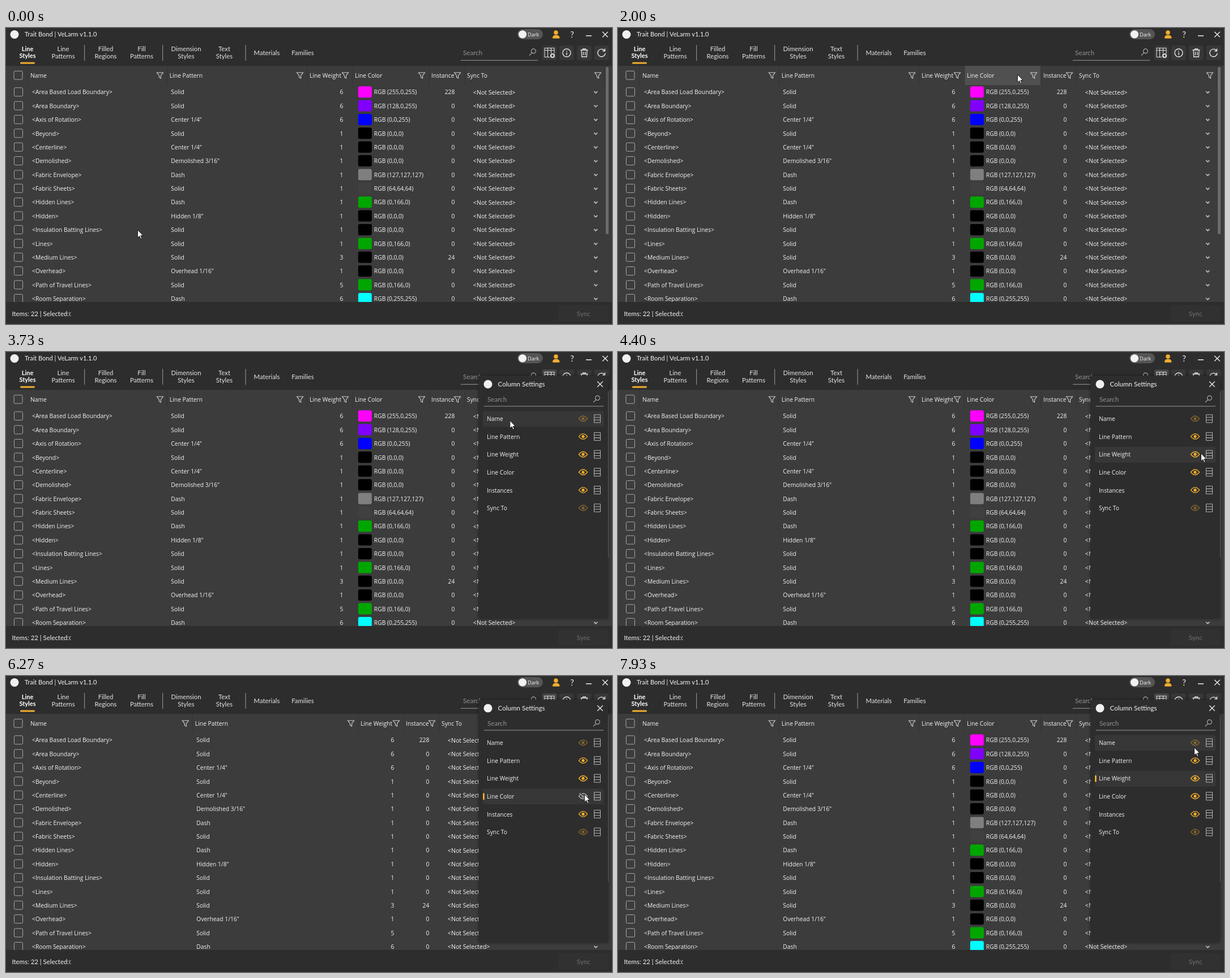
An HTML page with a canvas for the animation above (8000 ms loop, 1070x524 px).

```html
<!DOCTYPE html>
<html lang="en">
<head>
<meta charset="utf-8">
<title>Column settings</title>
<style>
html, body { margin: 0; width: 100%; height: 100%; overflow: hidden; background: #2d2d2d; }
canvas { display: block; width: 1070px; height: 524px; }
</style>
</head>
<body>
<canvas id="stage"></canvas>
<script>
const W = 1070, H = 524, LOOP = 8000;
const canvas = document.getElementById('stage');
const ctx = canvas.getContext('2d');
const ratio = window.devicePixelRatio || 1;
canvas.width = W * ratio;
canvas.height = H * ratio;

const UI = '"Open Sans", "Noto Sans", sans-serif';
const HEAD = 'Lato, "Open Sans", sans-serif';
const BAR = '#2d2d2d', BODY = '#3c3c3c', TEXT = '#f4f4f4', ICON = '#d0d0d0', GOLD = '#f2ae2e';

// name, pattern, weight, colour, instances
const ROWS = [
  ['Area Based Load Boundary', 'Solid', 6, '255,0,255', 228],
  ['Area Boundary', 'Solid', 6, '128,0,255', 0],
  ['Axis of Rotation', 'Center 1/4"', 6, '0,0,255', 0],
  ['Beyond', 'Solid', 1, '0,0,0', 0],
  ['Centerline', 'Center 1/4"', 1, '0,0,0', 0],
  ['Demolished', 'Demolished 3/16"', 1, '0,0,0', 0],
  ['Fabric Envelope', 'Dash', 1, '127,127,127', 0],
  ['Fabric Sheets', 'Solid', 1, '64,64,64', 0],
  ['Hidden Lines', 'Dash', 1, '0,166,0', 0],
  ['Hidden', 'Hidden 1/8"', 1, '0,0,0', 0],
  ['Insulation Batting Lines', 'Solid', 1, '0,0,0', 0],
  ['Lines', 'Solid', 1, '0,166,0', 0],
  ['Medium Lines', 'Solid', 3, '0,0,0', 24],
  ['Overhead', 'Overhead 1/16"', 1, '0,0,0', 0],
  ['Path of Travel Lines', 'Solid', 5, '0,166,0', 0],
  ['Room Separation', 'Dash', 6, '0,255,255', 0]
];
const FIELDS = ['Name', 'Line Pattern', 'Line Weight', 'Line Color', 'Instances', 'Sync To'];

// pointer path: time, x, y
const PATH = [
  [0, 232, 357], [530, 660, 140], [730, 795, 66], [870, 756, 55], [1600, 756, 55],
  [2000, 705, 82], [2070, 705, 82], [2470, 957, 46], [2600, 968, 49], [2740, 968, 49],
  [3070, 944, 104], [3600, 873, 113], [4270, 1032, 189], [4400, 1029, 179],
  [4470, 1025, 176], [5270, 1020, 213], [5470, 1020, 213], [5930, 1020.5, 219],
  [6070, 1021, 213], [6130, 1021, 209], [6470, 1021, 209], [6800, 1017, 182],
  [7600, 1017, 182], [7930, 1017, 126], [8000, 1017, 126]
];

function pointerAt(t) {
  let i = 1;
  while (i < PATH.length - 1 && t > PATH[i][0]) i++;
  const [t0, x0, y0] = PATH[i - 1], [t1, x1, y1] = PATH[i];
  const p = Math.min(1, Math.max(0, (t - t0) / (t1 - t0)));
  const e = p * p * (3 - 2 * p);
  return { x: x0 + (x1 - x0) * e, y: y0 + (y1 - y0) * e };
}

function stateAt(t) {
  const noColor = t >= 5530 && t < 6465;
  const noWeight = t >= 6925 && t < 7595;
  return {
    open: t >= 2795,
    hidden: noColor ? 3 : noWeight ? 2 : -1,
    selected: t >= 6860 ? 2 : t >= 5260 ? 3 : -1,
    pointer: pointerAt(t)
  };
}

function label(str, x, y, { size = 10.3, font = UI, color = TEXT, align = 'left', weight = 400 } = {}) {
  ctx.font = `${weight} ${size}px ${font}`;
  ctx.textAlign = align;
  ctx.fillStyle = color;
  ctx.fillText(str, x, y + size * 0.36);
}

function box(x, y, w, h, color, r = 0) {
  ctx.fillStyle = color;
  ctx.beginPath();
  ctx.roundRect(x, y, w, h, r);
  ctx.fill();
}

function frame(x, y, w, h, color, r = 0) {
  ctx.strokeStyle = color;
  ctx.lineWidth = 1;
  ctx.beginPath();
  ctx.roundRect(x, y, w, h, r);
  ctx.stroke();
}

function disc(x, y, r, color) {
  ctx.fillStyle = color;
  ctx.beginPath();
  ctx.arc(x, y, r, 0, Math.PI * 2);
  ctx.fill();
}

function stroke(x, y, d, color = ICON, width = 1.1) {
  ctx.save();
  ctx.translate(x, y);
  ctx.strokeStyle = color;
  ctx.lineWidth = width;
  ctx.stroke(new Path2D(d));
  ctx.restore();
}

const funnel = (x) => stroke(x, 84, 'M-5.5-5H5.5L1.5 .2V5L-1.5 3.2V.2Z');
const lens = (x, y) => stroke(x, y, 'M-1.2 1.4A4 4 0 1 1 1.2 2.4A4 4 0 0 1-1.2 1.4L-6 6', '#b0b0b0');
const cross = (x, y) => stroke(x, y, 'M-4.8-4.8L4.8 4.8M4.8-4.8L-4.8 4.8', '#f0f0f0', 1.3);
const check = (x, y) => frame(x - 7.5, y - 7.5, 15, 15, '#a8a8a8', 2);

function titleBar() {
  disc(15, 11.5, 7.5, '#f0f0f0');
  label('Trait Bond | VeLarm v1.1.0', 33, 11.5, { font: HEAD, size: 11 });
  box(903, 2, 45, 18, '#555', 9);
  disc(912, 11.3, 7, '#f2f2f2');
  label('Dark', 921, 11.3, { size: 9.2 });
  disc(971, 8, 3.8, GOLD);
  box(965, 12.5, 12.5, 6, GOLD, [5, 5, 1, 1]);
  label('?', 999.5, 11.5, { font: HEAD, size: 15, align: 'center' });
  box(1024, 13, 10, 1.5, '#f0f0f0');
  cross(1058, 11.5);
}

function tabs() {
  const opts = { font: HEAD, size: 11.3, align: 'center', color: '#e4e4e4' };
  const pairs = [['Line', 'Styles', 38], ['Line', 'Patterns', 101], ['Filled', 'Regions', 176],
    ['Fill', 'Patterns', 239.5], ['Dimension', 'Styles', 318], ['Text', 'Styles', 385.5]];
  pairs.forEach(([a, b, x], i) => {
    const o = i ? opts : { ...opts, weight: 700, color: '#fff', size: 11 };
    label(a, x, 37.3, o);
    label(b, x, 49.5, o);
  });
  label('Materials', 460.5, 44, opts);
  label('Families', 524, 44, opts);
  box(25, 60.5, 26, 3, GOLD, 1.5);
  for (const x of [138, 276, 422.5]) box(x, 30, 1.2, 28, '#8a8a8a');
}

function columnsIcon(x, y) {
  frame(x - 8.5, y - 8.5, 17, 16, '#e0e0e0');
  stroke(x, y, 'M-8.5-4.5H8.5M-3-8.5V7.5M3-8.5V7.5', '#e0e0e0');
  disc(x + 5.5, y + 5, 5.3, '#383838');
  stroke(x + 5.5, y + 5, 'M-3 0A3 3 0 1 0 3 0A3 3 0 1 0-3 0', '#e0e0e0', 2.2);
}

function tools(open) {
  label('Search', 807, 44, { font: HEAD, size: 11.6, color: '#929292' });
  box(803, 56.8, 136, 1, '#9a9a9a');
  lens(930, 42.5);
  [947, 977, 1008, 1039].forEach((x, i) => box(x, 31, 25.5, 26, open && !i ? '#484848' : '#383838', 3));
  columnsIcon(959.5, 44);
  stroke(990, 44, 'M-7 0A7 7 0 1 0 7 0A7 7 0 1 0-7 0M0-3.8V-2.2M0-.8V4', '#e8e8e8', 1.4);
  stroke(1021, 44, 'M-6.5-5H6.5M-2.5-5V-7H2.5V-5M-5-5L-4.3 7H4.3L5-5M-1.7-2V4M1.7-2V4', '#e8e8e8', 1.3);
  stroke(1051.5, 44, 'M5.5-3.8A6.7 6.7 0 1 0 6.7 .5M6-7.5V-3.3H1.8', '#e8e8e8', 1.4);
}

// fixed columns keep their width, the other three share what is left
function layout(hidden) {
  const widths = [0, 0, 80, 135, 63, 0];
  if (hidden >= 0) widths[hidden] = 0;
  const share = (1019.5 - widths.reduce((a, b) => a + b)) / 3;
  let x = 37;
  return widths.map((w, i) => {
    const col = { x, w: w || (i === hidden ? 0 : share), on: i !== hidden };
    x += col.w;
    return col;
  });
}

function headerRow(cols, pointer, open) {
  const fits = pointer.y > 67 && pointer.y < 101 && !open;
  check(21.5, 83.7);
  cols.forEach((c, i) => {
    if (!c.on) return;
    if (fits && pointer.x >= c.x && pointer.x < c.x + c.w) box(c.x, 67, c.w, 34, '#505050');
    box(c.x, 67, 1, 34, '#333');
    label(i === 4 ? 'Instance' : FIELDS[i], c.x + (i ? 4.7 : 6), 84);
    funnel(i === 5 ? 1045 : c.x + c.w - 12.3);
  });
  box(1056, 67, 1, 34, '#333');
}

function dataRow(row, y, cols) {
  const [name, pattern, weight, color, count] = row;
  const [, pat, wgt, clr, inst, sync] = cols;
  check(22, y - 0.5);
  label(`<${name}>`, 46, y);
  label(pattern, pat.x + 7.2, y);
  if (wgt.on) label(weight, wgt.x + 64, y, { align: 'right' });
  if (clr.on) {
    box(clr.x + 10.5, y - 10.5, 24, 20, `rgb(${color})`, 3);
    label(`RGB (${color})`, clr.x + 38.5, y);
  }
  label(count, inst.x + 46, y, { align: 'right' });
  label('<Not Selected>', sync.x + 15.5, y, { size: 10.6 });
  stroke(1041.3, y, 'M-3-1.5L0 1.5L3-1.5', '#b8b8b8', 1.8);
}

function table(state) {
  const cols = layout(state.hidden);
  ctx.save();
  ctx.beginPath();
  ctx.rect(0, 67, W, 418);
  ctx.clip();
  box(0, 67, W, 418, BODY);
  headerRow(cols, state.pointer, state.open);
  ROWS.forEach((row, i) => dataRow(row, 113.7 + i * 24.38, cols));
  box(1059, 69, 5, 296, '#6c6c6c', 2);
  ctx.restore();
}

function footer() {
  const opts = { font: HEAD, size: 11.4 };
  label('Items: 22 | Selected:', 10.5, 505.7, opts);
  ctx.save();
  ctx.beginPath();
  ctx.rect(111, 495, 3.5, 20);
  ctx.clip();
  label('0', 111.5, 506, { font: HEAD, size: 10 });
  ctx.restore();
  box(975, 491, 89, 29, '#313131', 3);
  label('Sync', 1019.7, 505.7, { font: HEAD, size: 11.6, color: '#707070', align: 'center' });
}

function eye(x, y, dim, off) {
  ctx.save();
  ctx.globalAlpha = dim ? 0.42 : 1;
  const color = off ? '#b0b0b0' : GOLD;
  stroke(x, y, 'M-7.5 0Q0-9.5 7.5 0Q0 9.5-7.5 0Z', color, 1.4);
  disc(x, y, 2.6, color);
  if (off) {
    stroke(x, y, 'M-6-6L7 6', '#363636', 3);
    stroke(x, y, 'M-6.5-5.5L6.5 6', color, 1.3);
  }
  ctx.restore();
}

function panel({ pointer, selected, hidden }) {
  ctx.save();
  ctx.shadowColor = 'rgba(0,0,0,.45)';
  ctx.shadowBlur = 5 * ratio;
  box(834.5, 42, 228.5, 430, BAR, 4);
  ctx.restore();
  disc(851, 57, 7.5, '#f0f0f0');
  label('Column Settings', 868.5, 57, { font: HEAD, size: 11.6 });
  cross(1049, 57);
  label('Search', 850, 84, { font: HEAD, size: 11.6, color: '#929292' });
  box(844, 95.5, 211, 1, '#9a9a9a');
  lens(1043, 83);
  FIELDS.forEach((name, i) => {
    const y = 118.5 + i * 31.6;
    const over = pointer.x > 842 && pointer.x < 1055 && Math.abs(pointer.y - y) < 14;
    if (over || i === selected) box(842, y - 14, 213.5, 28, '#373737', 3);
    if (i === selected) box(842, y - 6, 2.8, 12, GOLD, 1.4);
    label(name, 849, y);
    eye(1019, y - 0.5, i === 0 || i === 5, i === hidden);
    frame(1038.5, y - 7.5, 11, 14, '#b4b4b4');
    stroke(1044, y - 0.5, 'M-5.5-2.3H5.5M-5.5 2.3H5.5', '#b4b4b4');
  });
}

const ARROW = new Path2D('M.5 .5V14.2L3.7 11.3L5.9 16.4L8 15.5L5.8 10.6H10Z');
function cursor({ x, y }) {
  ctx.save();
  ctx.translate(x, y);
  ctx.fillStyle = '#fff';
  ctx.strokeStyle = '#111';
  ctx.lineWidth = 0.9;
  ctx.fill(ARROW);
  ctx.stroke(ARROW);
  ctx.restore();
}

function draw(t) {
  const state = stateAt(t);
  ctx.setTransform(ratio, 0, 0, ratio, 0, 0);
  box(0, 0, W, H, BAR);
  titleBar();
  tabs();
  tools(state.open);
  table(state);
  footer();
  if (state.open) panel(state);
  cursor(state.pointer);
}

const start = performance.now();
function tick() {
  const t = (performance.now() - start) % LOOP;
  draw(Math.floor((t + 5) * 0.015) / 0.015);
  requestAnimationFrame(tick);
}
tick();
</script>
</body>
</html>
```
